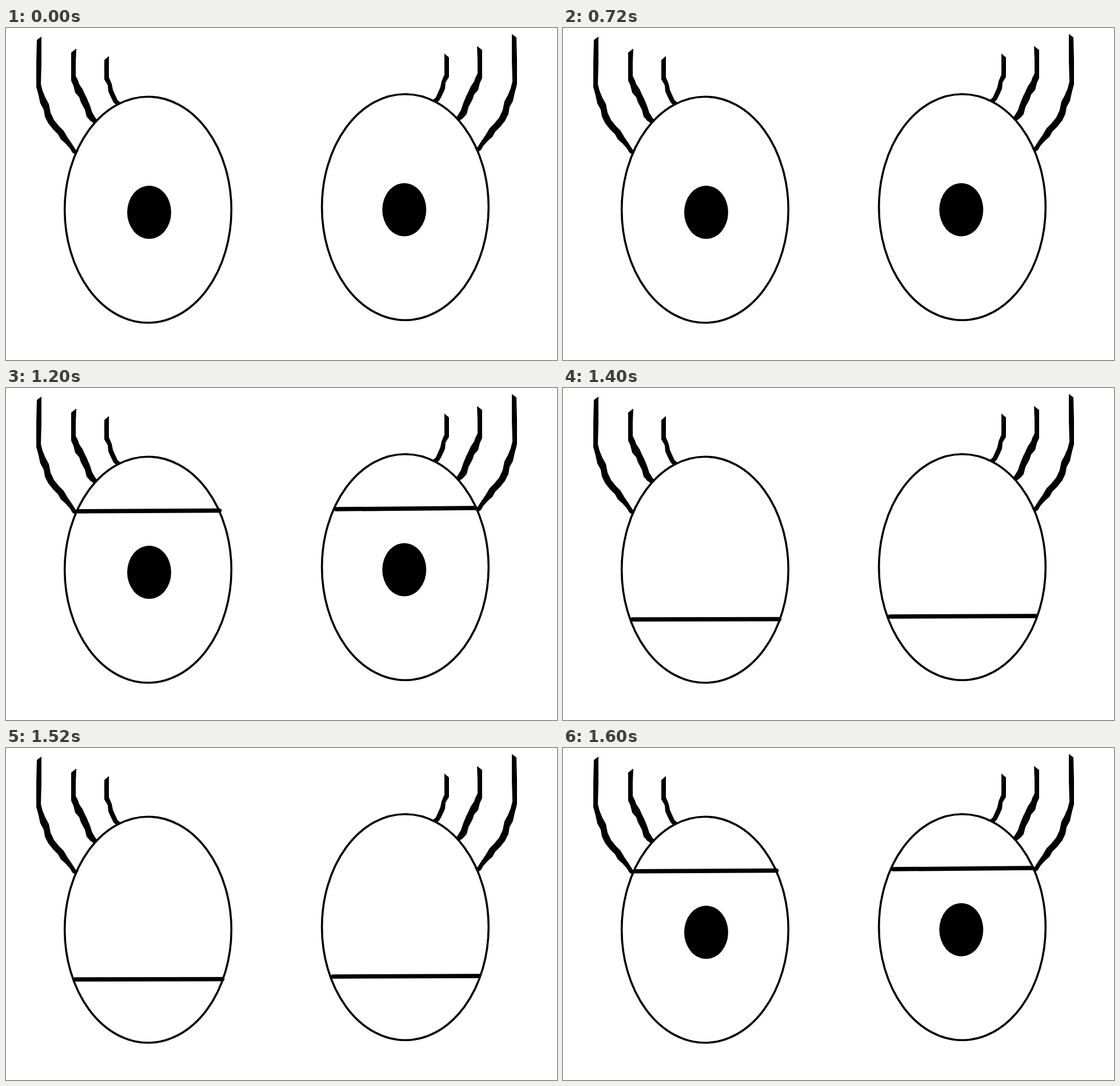
An HTML page without scripts for the animation above (1800 ms loop, 964 by 581 pixels).

```html
<!DOCTYPE html>
<html lang="en">
<head>
<meta charset="utf-8">
<title>Blinking eyes</title>
<style>
  html, body { margin: 0; width: 100%; height: 100%; overflow: hidden; background: #fff; }
  svg { display: block; width: 100%; height: 100%; }
  .lid { stroke: #000; stroke-width: 7.5; stroke-linecap: round; }
  .half, .shut { opacity: 0; }
  .half { animation: half 1.8s step-end infinite; }
  .shut { animation: shut 1.8s step-end infinite; }
  .pupil { animation: pupil 1.8s step-end infinite; }
  /* open 1200 ms, half 200, shut 200, half 200 */
  @keyframes half {
    0% { opacity: 0; }
    66.6667% { opacity: 1; }
    77.7778% { opacity: 0; }
    88.8889%, 100% { opacity: 1; }
  }
  @keyframes shut {
    0% { opacity: 0; }
    77.7778% { opacity: 1; }
    88.8889%, 100% { opacity: 0; }
  }
  @keyframes pupil {
    0% { opacity: 1; }
    77.7778% { opacity: 0; }
    88.8889%, 100% { opacity: 1; }
  }
</style>
</head>
<body>
<svg viewBox="0 0 964 581">
  <defs>
    <g id="eye">
      <ellipse cx="248.5" cy="318" rx="145.8" ry="197.8" fill="none" stroke="#000" stroke-width="3.6"/>
      <path d="M62 15V60L61 98 64 110 69 122 75 133 78 148 84 161 93 172 101 180 108 192 115 202 122 213 127 214 122 222 116 218 112 211 104 202 96 195 91 186 82 177 74 167 68 155 66 143 60 132 57 118 53 103V60L54 21Z"/>
      <path d="M123 36L122 60V84L126 92 128 98 134 107 138 116 142 124 147 136 151 148 157 158 161 162 154 167 147 162 141 155 138 143 131 130 128 121 121 113 118 101 114 92V43Z"/>
      <path d="M180 49V86L185 98 187 108 190 115 195 126 201 131 193 135 188 130 183 120 179 111 178 100 172 90V56Z"/>
    </g>
    <ellipse id="pupil" cx="250.5" cy="322.5" rx="38.5" ry="46.5"/>
  </defs>

  <use href="#eye"/>
  <use href="#eye" transform="translate(947 -4.5) scale(-1 1)"/>

  <g class="pupil">
    <use href="#pupil"/>
    <use href="#pupil" x="446.3" y="-4.5"/>
  </g>

  <g class="lid half">
    <path d="M127 215.7L373.5 214.5M577.5 212L821 210"/>
  </g>
  <g class="lid shut">
    <path d="M121.5 405L378.5 404.5M572 400L827 399"/>
  </g>
</svg>
</body>
</html>
```
